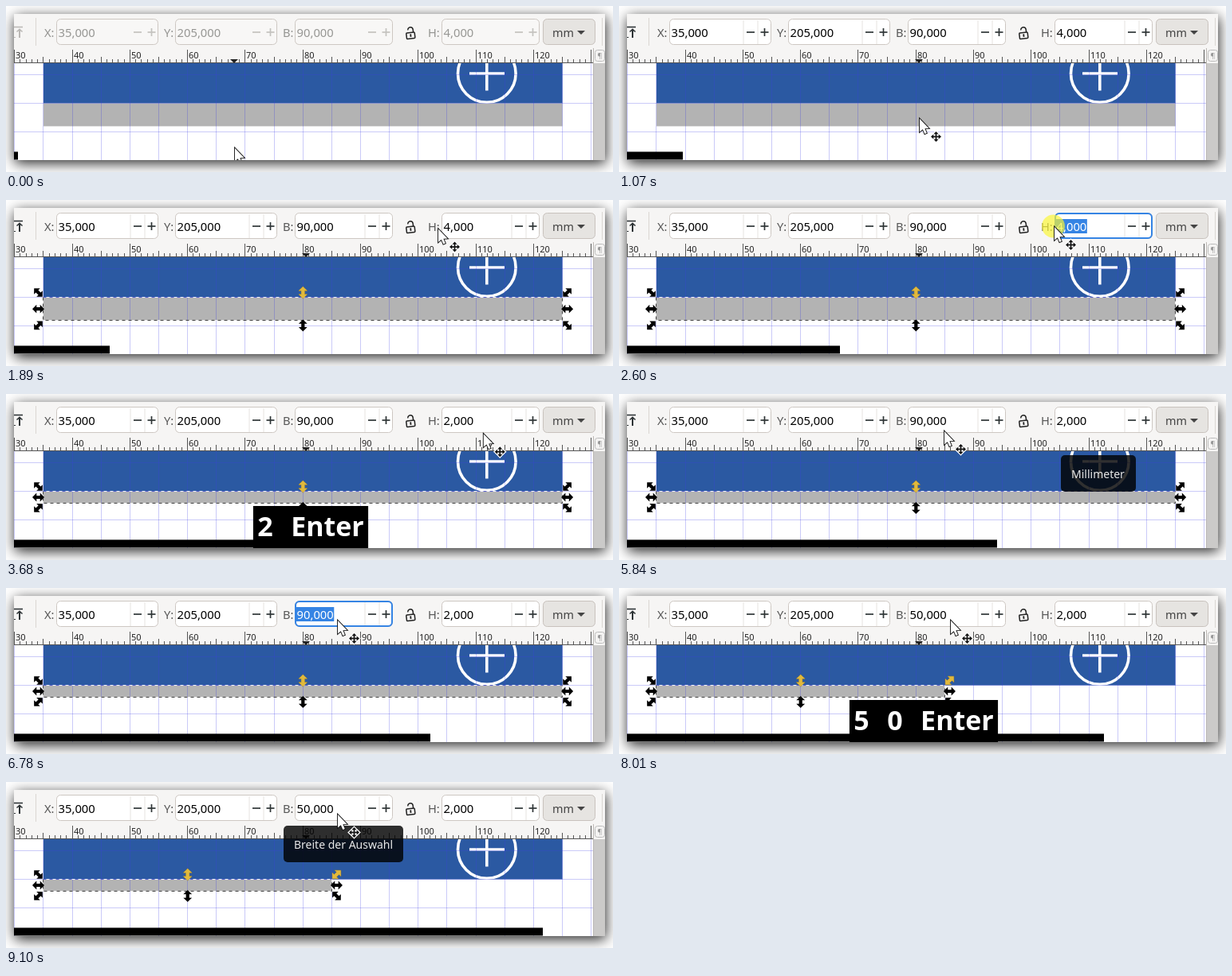
Write an HTML page with a canvas that moves like this. It is 761 by 209 pixels and loops after 9170 ms.

```html
<!DOCTYPE html>
<html lang="de">
<head>
<meta charset="utf-8">
<style>
html, body { margin: 0; width: 100%; height: 100%; overflow: hidden; background: #fff; }
canvas { display: block; }
</style>
</head>
<body>
<canvas id="stage" width="761" height="209"></canvas>
<script>
const ctx = document.getElementById('stage').getContext('2d');
const FONT = '"Noto Sans", "Open Sans", sans-serif';
const LOOP = 9170;
const MM = 7.229;
const mmToX = mm => 47 + (mm - 35) * MM;
const mmToPixel = mm => Math.floor(mmToX(mm) - .1) + .5;

const BEATS = [[0, 1], [70, 10], [1070, 10], [2090, 9], [3030, 9], [3970, 9], [4920, 9],
  [5840, 9], [6780, 9], [7700, 9], [8630, 6], [LOOP, 1]];
function snap(t) {
  const i = BEATS.findLastIndex(b => b[0] <= t);
  const [start, steps] = BEATS[i];
  const length = (BEATS[i + 1][0] - start) / steps;
  return start + Math.min(steps - 1, Math.floor((t - start + 14) / length)) * length;
}

// Pointer path: [time, x, y]
const PATH = [[0, 286, 178], [150, 286, 178], [850, 376, 141], [1250, 376, 141], [1950, 545, 33],
  [3430, 545, 33], [3830, 633, 60], [5150, 633, 60], [5720, 407, 46], [5900, 407, 46],
  [6250, 415, 40], [LOOP, 415, 40]];
function pointerAt(t) {
  const i = PATH.findLastIndex(p => p[0] <= t);
  const [t0, x0, y0] = PATH[i], [t1, x1, y1] = PATH[i + 1];
  const u = (t - t0) / (t1 - t0), e = u * u * (3 - 2 * u);
  return [x0 + (x1 - x0) * e, y0 + (y1 - y0) * e];
}

const CLICKS = [[800, 1000], [2420, 2760], [6330, 6600]];
const KEYS = [[2880, '2'], [3350, 'Enter'], [7000, '5'], [7220, '0'], [7730, 'Enter']];
const KEY_LIFE = 1250;
const between = (t, a, b) => t >= a && t < b;

function rect(x, y, w, h, color) {
  ctx.fillStyle = color;
  ctx.fillRect(x, y, w, h);
}
function rounded(x, y, w, h, r, fill, stroke, width = 1) {
  ctx.beginPath();
  ctx.roundRect(x, y, w, h, r);
  if (fill) { ctx.fillStyle = fill; ctx.fill(); }
  if (stroke) { ctx.strokeStyle = stroke; ctx.lineWidth = width; ctx.stroke(); }
}
function line(color, width, ...points) {
  ctx.beginPath();
  points.forEach(([x, y]) => ctx.lineTo(x, y));
  ctx.strokeStyle = color;
  ctx.lineWidth = width;
  ctx.stroke();
}
function polygon(points, fill, stroke, width = 1) {
  ctx.beginPath();
  points.forEach(([x, y]) => ctx.lineTo(x, y));
  ctx.closePath();
  if (stroke) { ctx.strokeStyle = stroke; ctx.lineWidth = width; ctx.stroke(); }
  ctx.fillStyle = fill;
  ctx.fill();
}
function text(str, x, y, size, color, weight = '') {
  ctx.font = `${weight} ${size}px ${FONT}`;
  ctx.fillStyle = color;
  ctx.fillText(str, x, y);
}
function at(x, y, angle, draw) {
  ctx.save();
  ctx.translate(x, y);
  ctx.rotate(angle);
  draw();
  ctx.restore();
}

function drawWindow() {
  rect(0, 0, 761, 209, '#fff');
  ctx.save();
  ctx.shadowColor = 'rgba(0,0,0,.85)';
  ctx.shadowBlur = 16;
  ctx.shadowOffsetX = 1;
  ctx.shadowOffsetY = 4;
  rect(10, 10, 741, 184, '#f6f5f4');
  ctx.restore();
}

function drawPage(w, h) {
  rect(10, 72, 726, 122, '#fff');
  rect(47, 72, mmToX(125) - 47, 50.5, '#2b59a2');
  rect(47, 122.5, w * MM, h * MM, '#b3b3b3');
  ctx.beginPath();
  ctx.arc(602.8, 85, 36.3, 0, 7);
  ctx.strokeStyle = '#fff';
  ctx.lineWidth = 3.6;
  ctx.stroke();
  line('#fff', 3.6, [581, 85], [625, 85]);
  line('#fff', 3.6, [602.8, 64], [602.8, 106.5]);
  const grid = 'rgba(60,60,230,.27)';
  for (let mm = 30; mm <= 130; mm += 5) {
    const x = mmToPixel(mm);
    line(grid, 1, [x, 72], [x, 194]);
  }
  for (const y of [86.5, 122.5, 158.5]) line(grid, 1, [10, y], [736, y]);
}

function drawHandle(x, y, angle, color) {
  const half = [[0, -7.5], [5.4, -2.2], [2.1, -2.2], [2.1, 2.2], [5.4, 2.2], [0, 7.5]];
  const shape = half.concat(half.slice(1, 5).reverse().map(([a, b]) => [-a, b]));
  at(x, y, angle, () => polygon(shape, color, color === '#000' ? null : '#8a7430', .8));
}

function drawSelection(w, h, narrow) {
  const left = 46.5, top = 122.5;
  const right = 47 + w * MM, bottom = top + h * MM, middle = (47 + right) / 2;
  const boxRight = left + Math.round(right - left), boxBottom = top + Math.ceil(h * MM);
  const edge = (dark, light, ...points) => {
    line(light, 1, ...points);
    ctx.setLineDash([4, 4]);
    line(dark, 1, ...points);
    ctx.setLineDash([]);
  };
  edge('#5b62cc', '#f4f4ff', [left, top], [boxRight, top]);
  edge('#444', '#eee', [left, top], [left, boxBottom], [boxRight, boxBottom], [boxRight, top]);

  const gold = '#e2b93b', l = 40.5, r = right + 6, t = 116.5, b = bottom + 6.5, c = (t + b) / 2;
  const q = Math.PI / 4;
  drawHandle(l, t, -q, '#000');
  drawHandle(l, b, q, '#000');
  drawHandle(l, c, 2 * q, '#000');
  drawHandle(r, t, q, narrow ? gold : '#000');
  drawHandle(r, b, -q, '#000');
  drawHandle(r, c, 2 * q, '#000');
  drawHandle(middle, t, 0, gold);
  drawHandle(middle, b, 0, '#000');
}

function drawRuler(marker) {
  rect(10, 53, 741, 19, '#f6f5f4');
  line('#d3cfcb', 1, [10, 52.5], [751, 52.5]);
  for (let mm = 30; mm <= 130; mm++) {
    const x = mmToPixel(mm);
    const top = mm % 10 === 0 ? 55 : mm % 5 === 0 ? 64 : 67;
    line('#555', 1, [x, top], [x, 71]);
    if (mm % 10 === 0 && mm < 130) text(mm, x + 1.5, 66, 11, '#222');
  }
  line('#555', 1, [10, 71.5], [736, 71.5]);
  polygon([[marker - 5, 67], [marker + 5, 67], [marker, 72]], '#222');
  rect(736, 72, 15, 122, '#cbcac9');
  line('#bdb9b5', 1, [736.5, 53], [736.5, 194]);
  rounded(738.5, 55.5, 12, 14, 3, '#f4f3f2', '#bbb');
  text('¶', 741.5, 66, 9, '#999');
}

function drawField(label, labelX, x, w, value, enabled, focused, selected) {
  text(label, labelX, 39, 14.67, enabled ? '#555' : '#939390');
  rounded(x + .5, 16.5, w - 1, 32, 5, enabled ? '#fff' : '#f8f7f6', '#cdc7c2');
  const minus = x + w - 26, plus = x + w - 8.5;
  if (enabled) for (const sep of [minus - 9, minus + 9]) line('#e6e3e0', 1, [sep, 18], [sep, 48]);
  if (focused) rounded(x + 1, 17, w - 2, 31, 5, null, '#3584e4', 2);
  ctx.font = `14.8px ${FONT}`;
  const width = ctx.measureText(value).width;
  if (selected) rect(x + 2, 24, width + 1, 18, '#3584e4');
  text(value, x + 2.5, 39, 14.8, selected ? '#fff' : enabled ? '#000' : '#979794');
  if (focused && !selected) line('#111', 1, [x + width + 3.5, 24], [x + width + 3.5, 43]);
  const sign = enabled ? '#2e3436' : '#c4c2bf';
  line(sign, 1.7, [minus - 5, 33], [minus + 5, 33]);
  line(sign, 1.7, [plus - 5, 33], [plus + 5, 33]);
  line(sign, 1.7, [plus, 28], [plus, 38]);
}

function drawToolbar(t) {
  rect(10, 10, 741, 43, '#f6f5f4');
  const on = t >= 880;
  const icon = on ? '#2e3436' : '#bbb9b6';
  line(icon, 1.6, [10, 26.5], [21, 26.5]);
  line(icon, 2, [17, 29], [17, 40]);
  line(icon, 1.6, [13.5, 32.5], [17, 29.3], [20.5, 32.5]);
  line(icon, 1, [10, 39.5], [12, 39.5]);
  for (const x of [37.5, 747.5]) line('#dad6d2', 1, [x, 15], [x, 50]);

  const widthFocus = between(t, 6380, 7730), heightFocus = between(t, 2480, 3350);
  const widthValue = t < 7000 ? '90,000' : t < 7220 ? '5' : t < 7730 ? '50' : '50,000';
  const heightValue = t < 2880 ? '4,000' : t < 3350 ? '2' : '2,000';
  drawField('X:', 48, 63, 128, '35,000', on);
  drawField('Y:', 198, 212, 128, '205,000', on);
  drawField('B:', 347, 362, 123, widthValue, on, widthFocus, widthFocus && t < 7000);
  drawField('H:', 529, 546, 123, heightValue, on, heightFocus, heightFocus && t < 2880);

  at(507, 36.5, -.12, () => {
    rounded(-5, -3, 10.5, 7.5, 1, '#f6f5f4', '#222', 1.5);
    rect(-.6, -1, 1.8, 3.5, '#222');
    ctx.beginPath();
    ctx.moveTo(4, -3);
    ctx.lineTo(4, -6.5);
    ctx.arc(.8, -6.5, 3.2, 0, Math.PI, true);
    ctx.stroke();
  });
  rounded(673.5, 16.5, 65, 32, 5, '#e6e4e1', '#c8c2bd');
  text('mm', 685, 39, 14.4, '#444');
  polygon([[716, 31], [726, 31], [721, 36]], '#444');
}

function drawTooltip(str, x, y, w) {
  rounded(x, y, w, 46, 5, 'rgba(0,0,0,.81)');
  text(str, x + 13, y + 29, 14, '#e8e8e8');
}

function drawKeys(t) {
  const keys = KEYS.filter(([start]) => between(t, start, start + KEY_LIFE)).map(k => k[1]);
  if (!keys.length) return;
  const gap = 22.5, pad = 5.3;
  ctx.font = `bold 34px ${FONT}`;
  const widths = keys.map(k => ctx.measureText(k).width);
  const total = widths.reduce((a, b) => a + b + gap) + 2 * pad;
  let x = 382 - total / 2;
  rect(x, 141, total, 53, '#000');
  x += pad;
  keys.forEach((key, i) => {
    text(key, x, 179, 34, '#fff', 'bold');
    x += widths[i] + gap;
  });
}

function drawPointer(x, y, cross) {
  const arrow = [[0, 0], [0, 16.5], [3.8, 13.2], [6.3, 19], [8.8, 18], [6.4, 12.2], [11.5, 12]];
  at(x + 1, y + 1, 0, () => polygon(arrow, '#fff', '#111', 1.8));
  if (!cross) return;
  for (const pass of [['#fff', 4.2, 2.5], ['#111', 1.7, 0]]) {
    for (let i = 0; i < 4; i++) {
      at(x + 21.5, y + 23.5, i * Math.PI / 2, () => {
        line(pass[0], pass[1], [0, 0], [0, -4]);
        polygon([[0, -6.5], [-3, -3.2], [3, -3.2]], pass[0], pass[2] && pass[0], pass[2]);
      });
    }
  }
}

function draw(time) {
  const t = snap(time);
  const [x, y] = pointerAt(t);
  const w = t < 7730 ? 90 : 50, h = t < 3350 ? 4 : 2;
  drawWindow();
  ctx.save();
  ctx.beginPath();
  ctx.rect(10, 10, 741, 184);
  ctx.clip();
  drawPage(w, h);
  if (t >= 1130) drawSelection(w, h, w < 90);
  drawRuler(Math.min(x, 376));
  drawToolbar(t);
  if (between(t, 4300, 5870)) drawTooltip('Millimeter', 554, 77, 94);
  if (t >= 8300) drawTooltip('Breite der Auswahl', 348, 55, 150);
  drawKeys(t);
  if (CLICKS.some(([a, b]) => between(t, a, b))) {
    ctx.beginPath();
    ctx.arc(x - .5, y, 14.5, 0, 7);
    ctx.fillStyle = 'rgba(250,246,50,.68)';
    ctx.fill();
  }
  drawPointer(x, y, y < 152);
  const end = Math.floor(15 + .0613 * t + (t >= 2300 ? 102 : 0));
  rect(10, 183.5, end - 10, 10, '#000');
  ctx.restore();
}

function frame() {
  draw(performance.now() % LOOP);
  requestAnimationFrame(frame);
}
frame();
</script>
</body>
</html>
```
